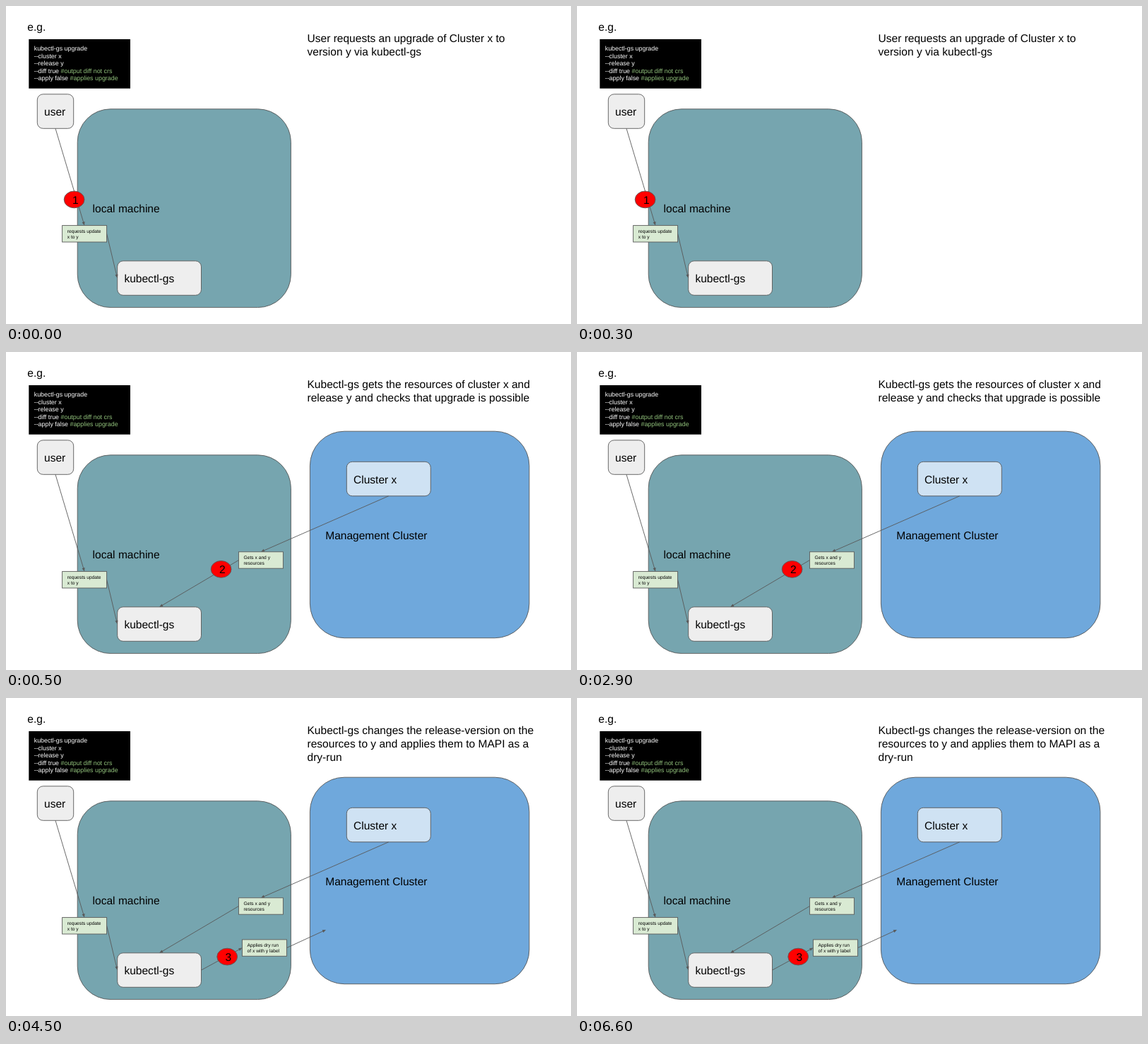
These frames come from a looping animation (800 px wide and 450 px high, 8000 ms). An HTML page:

```html
<!DOCTYPE html>
<html lang="en">
<head>
<meta charset="utf-8">
<title>Cluster upgrade steps</title>
<style>
  html, body { margin: 0; width: 100%; height: 100%; overflow: hidden; background: #fff; }
  svg { display: block; width: 800px; height: 450px; }
  text { font: 15.556px "Liberation Sans", Arial, sans-serif; text-rendering: geometricPrecision; white-space: pre; }
  .code text { font-size: 8.889px; fill: #fff; }
  .code .note { fill: #93c47d; }
  .label text { font-size: 6.667px; }
  .box { stroke: #595959; stroke-width: .9; }
  .line { stroke: #595959; stroke-width: .9; }
  .head { fill: #595959; }
</style>
</head>
<body>
<svg id="stage" viewBox="0 0 800 450"></svg>
<script>
const LOOP = 8000;
const STARTS = [0, 500, 4500];
const NS = "http://www.w3.org/2000/svg";
const stage = document.getElementById("stage");

function add(parent, tag, attrs = {}, content = "") {
  const node = document.createElementNS(NS, tag);
  for (const key in attrs) node.setAttribute(key, attrs[key]);
  node.textContent = content;
  return parent.appendChild(node);
}

// Shown while first <= step <= last.
const layers = [];
function layer(first = 0, last = 2) {
  const node = add(stage, "g");
  layers.push({ node, first, last });
  return node;
}

function box(parent, x, y, width, height, fill, rx = 0) {
  add(parent, "rect", { class: "box", x, y, width, height, fill, rx });
}

function lines(parent, x, y, step, rows) {
  rows.forEach((row, i) => add(parent, "text", { x, y: y + i * step }, row));
}

function label(parent, x, y, rows) {
  const group = add(parent, "g", { class: "label" });
  box(group, x, y, 63, 23.4, "#d9ead3");
  lines(group, x + 7.2, y + 10.4, 8, rows);
}

function arrow(parent, x1, y1, x2, y2) {
  const angle = Math.atan2(y2 - y1, x2 - x1);
  const stopX = x2 - 4 * Math.cos(angle), stopY = y2 - 4 * Math.sin(angle);
  add(parent, "line", { class: "line", x1, y1, x2: stopX, y2: stopY });
  add(parent, "path", {
    class: "head", d: "M0 0L-5 -2.1V2.1Z",
    transform: `translate(${x2} ${y2}) rotate(${angle * 180 / Math.PI})`
  });
}

function badge(parent, cx, cy, digit) {
  add(parent, "ellipse", { class: "box", cx, cy, rx: 14.4, ry: 11.9, fill: "#f00" });
  add(parent, "text", { x: cx + 1.7, y: cy + 5.7, "text-anchor": "middle" }, digit);
}

// Always visible: terminal, user, local machine
const base = layer();
lines(base, 30.3, 34.6, 0, ["e.g."]);
add(base, "rect", { x: 32.3, y: 47, width: 143.7, height: 69.7 });
const code = add(base, "g", { class: "code" });
lines(code, 39.7, 63, 10.6, ["kubectl-gs upgrade", "--cluster x", "--release y", "--diff true ", "--apply false "]);
["#output diff not crs", "#applies upgrade"].forEach((note, i) =>
  add(code.children[3 + i], "tspan", { class: "note" }, note));

box(base, 101.2, 145.8, 302.2, 280.8, "#76a5af", 46.8);
box(base, 44.3, 124.8, 51.4, 48.5, "#eee", 8.1);
lines(base, 54, 155, 0, ["user"]);
lines(base, 122.6, 292, 0, ["local machine"]);
box(base, 157.7, 360.8, 118.8, 48.5, "#eee", 8.1);
lines(base, 167.4, 390.6, 0, ["kubectl-gs"]);
arrow(base, 70, 173.4, 111, 310.4);
arrow(base, 142.6, 322.2, 157.6, 385);
label(base, 79.6, 310.6, ["requests update", "x to y"]);

// Management cluster and fetched resources
const cluster = layer(1);
box(cluster, 430.4, 112.2, 310.5, 292.5, "#6fa8dc", 48.7);
box(cluster, 482.3, 155.3, 119, 48.5, "#cfe2f3", 8.1);
lines(cluster, 492, 185.6, 0, ["Cluster x"]);
lines(cluster, 452.2, 264.5, 0, ["Management Cluster"]);
arrow(cluster, 541.7, 203.8, 361, 282.8);
arrow(cluster, 329.4, 294.6, 217.2, 360.8);
label(cluster, 329.4, 282.8, ["Gets x and y", "resources"]);

// Dry run
const dryRun = layer(2);
arrow(dryRun, 276.6, 385, 334.4, 353.6);
arrow(dryRun, 397.4, 353.6, 453, 328);
label(dryRun, 334.4, 341.9, ["Applies dry run", "of x with y label"]);

// Caption and badge of each step
[
  [96.6, 273.9, ["User requests an upgrade of Cluster x to", "version y via kubectl-gs"]],
  [304.6, 307.4, ["Kubectl-gs gets the resources of cluster x and", "release y and checks that upgrade is possible"]],
  [313.2, 366.1, ["Kubectl-gs changes the release-version on the", "resources to y and applies them to MAPI as a", "dry-run"]]
].forEach(([cx, cy, caption], i) => {
  const group = layer(i, i);
  lines(group, 426.5, 51.2, 18.8, caption);
  badge(group, cx, cy, String(i + 1));
});

const origin = performance.now();
function draw(now) {
  const time = Math.max(0, now - origin) % LOOP;
  const step = STARTS.filter(start => time >= start).length - 1;
  for (const { node, first, last } of layers) {
    node.style.display = step >= first && step <= last ? "" : "none";
  }
  requestAnimationFrame(draw);
}
draw(origin);
</script>
</body>
</html>
```
